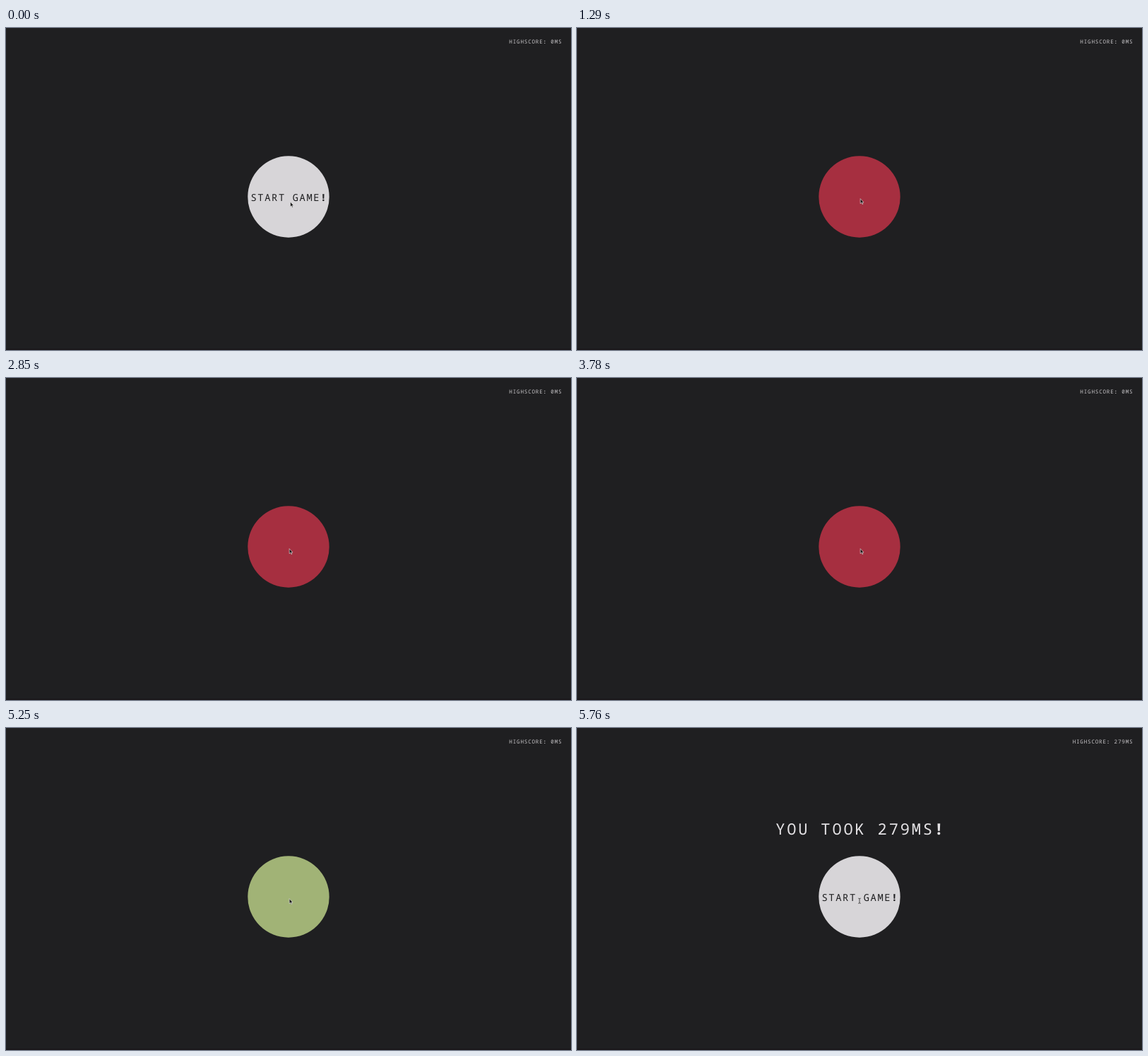
These frames come from a looping animation (800x456 px, 7.02 s). An HTML page:

```html
<!DOCTYPE html>
<html lang="en">
<head>
<meta charset="utf-8">
<title>Reaction game</title>
<style>
html, body { margin: 0; width: 100%; height: 100%; overflow: hidden; background: #1f1f21; }
svg { display: block; }
text { font-family: "Noto Sans Mono", "DejaVu Sans Mono", monospace; font-weight: 100;
  fill: #e4e2e5; white-space: pre; text-rendering: geometricPrecision; }
tspan { font-weight: 800; }
#start { fill: #1f1f21; }
#score { fill: #c4c2c5; }
</style>
</head>
<body>
<svg width="800" height="456" viewBox="0 0 800 456">
  <rect width="800" height="456" fill="#1f1f21"/>
  <rect y="454" width="800" height="2" fill="#1a181b"/>
  <circle id="button" cx="400" cy="239" r="57.7"/>
  <text id="score"></text>
  <text id="result"></text>
  <text id="start"></text>
  <path id="arrow" d="M0 0V7L1.6 5.5 2.7 8 3.8 7.5 2.7 5.2H4.8z" fill="#111" stroke="#eee" stroke-width=".6"/>
  <path id="beam" d="M-1.7-3.6Q0-3.6 0-2.6Q0-3.6 1.7-3.6M0-2.6V2.6M-1.7 3.6Q0 3.6 0 2.6Q0 3.6 1.7 3.6" fill="none" stroke="#222" stroke-width=".8"/>
</svg>
<script>
const LOOP = 7020, RED_AT = 1290, GREEN_AT = 5250, DONE_AT = 5520;
const el = id => document.getElementById(id);
const show = (id, on) => el(id).setAttribute("visibility", on ? "visible" : "hidden");
const ramp = (t, from, to) => Math.min(1, Math.max(0, (t - from) / (to - from)));
const mix = (a, b, k) => a + (b - a) * k;

// Monospaced line; punctuation is heavy, each glyph sits centred in its cell.
function label(id, text, size, pitch, left, baseline) {
  const gap = pitch - size * 0.6, node = el(id);
  node.innerHTML = text.replace(/[!:]/g, "<tspan>$&</tspan>");
  node.setAttribute("font-size", size);
  node.setAttribute("letter-spacing", gap);
  node.setAttribute("x", left + gap / 2);
  node.setAttribute("y", baseline);
}

function setScore(ms) {
  const text = `HIGHSCORE: ${ms}MS`, pitch = 5.36;
  label("score", text, 7.6, pitch, 787 - text.length * pitch, 22.2);
}

label("result", "YOU TOOK 279MS!", 22, 16.05, 279.7, 150.8);
label("start", "START GAME!", 13.8, 9.87, 345.7, 244.9);

let lastScore;
function draw(t) {
  const playing = t >= RED_AT && t < DONE_AT, done = t >= DONE_AT;
  const score = done ? 279 : 0;
  if (score !== lastScore) setScore(lastScore = score);
  el("button").setAttribute("fill", !playing ? "#d7d5d8" : t < GREEN_AT ? "#a62f40" : "#a1b376");
  show("start", !playing);
  show("result", done);

  const up = ramp(t, 360, 720), down = ramp(t, DONE_AT - 30, 5760);
  const x = done ? mix(401, 400, down) : mix(402.6, 401.2, up);
  const y = done ? mix(241.8, 244.8, down) : mix(246.2, 241.7, up);
  const beam = done || !playing && y < 245;
  show("beam", beam);
  show("arrow", !beam);
  el(beam ? "beam" : "arrow").setAttribute("transform", `translate(${x} ${y})`);
}

const origin = performance.now();
function tick() {
  draw((performance.now() - origin) % LOOP);
  requestAnimationFrame(tick);
}
tick();
</script>
</body>
</html>
```
